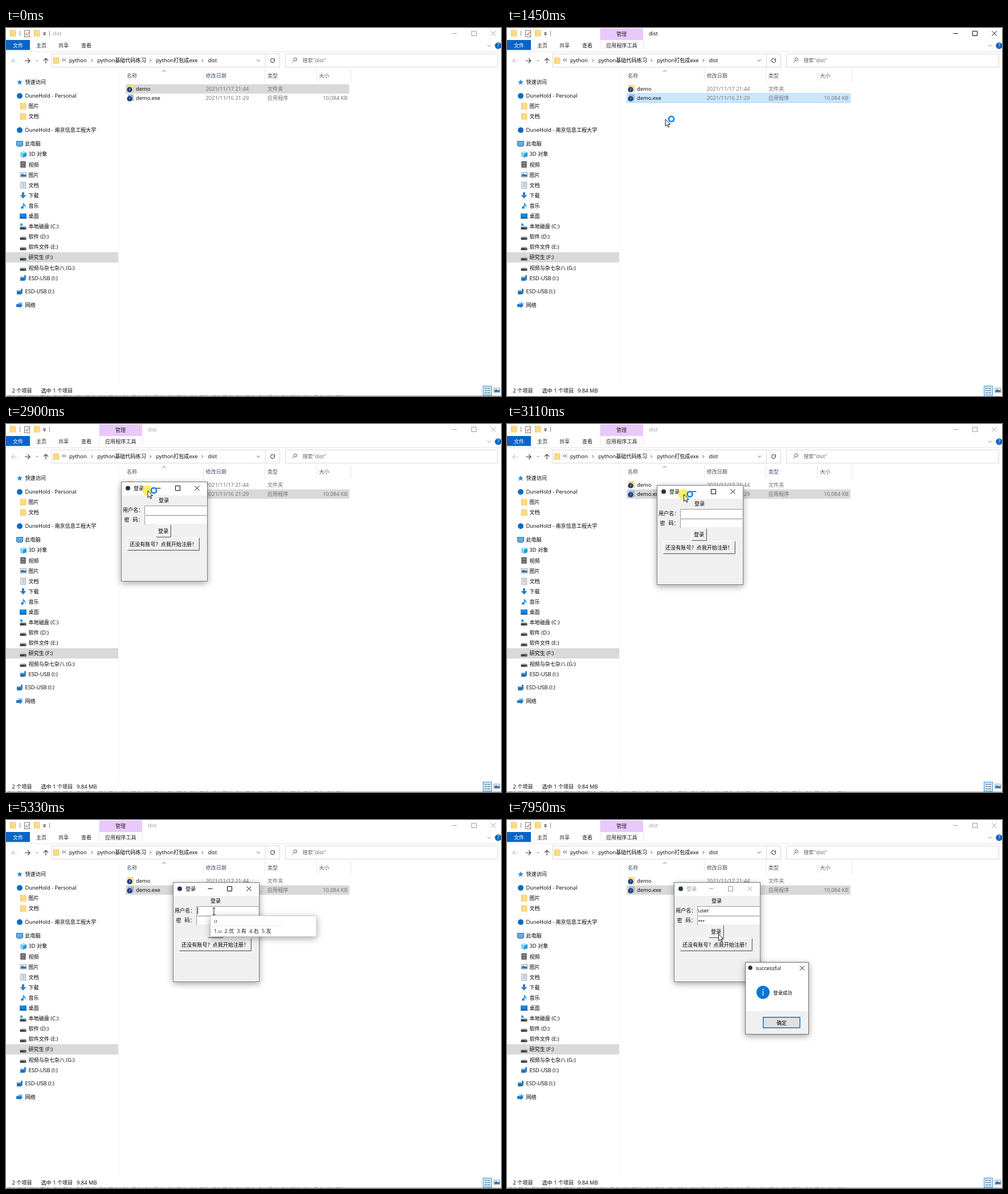
Write an HTML page that moves like this. It is 869x645 px and loops after 8 s.

```html
<!DOCTYPE html>
<html lang="zh">
<head>
<meta charset="utf-8">
<style>
html, body { margin: 0; width: 100%; height: 100%; overflow: hidden; background: #fff; }
svg { display: block; width: 869px; height: 645px; }
text { font-family: "Open Sans", "Noto Sans", "Noto Sans CJK SC", "Noto Sans CJK", sans-serif; white-space: pre; }
.float { filter: drop-shadow(0 3px 6px rgba(0,0,0,.36)); }
</style>
</head>
<body>
<svg id="stage" viewBox="0 0 869 645"></svg>
<script>
const LOOP = 8000;
const LATIN = 9.35, HAN = 9.1;

// ---- drawing helpers (strings of SVG) ----
const rect = (x, y, w, h, fill, extra = '') =>
  `<rect x="${x}" y="${y}" width="${w}" height="${h}" fill="${fill}" ${extra}/>`;
const box = (x, y, w, h, fill, stroke) => rect(x, y, w, h, fill, `stroke="${stroke}"`);
const disc = (x, y, r, fill, extra = '') => `<circle cx="${x}" cy="${y}" r="${r}" fill="${fill}" ${extra}/>`;
const shape = (d, fill) => `<path d="${d}" fill="${fill}"/>`;
const line = (d, color, width = 1) =>
  `<path d="${d}" fill="none" stroke="${color}" stroke-width="${width}"/>`;
const group = (id, body, cls = '') => `<g id="${id}" class="${cls}">${body}</g>`;

// y is the middle of the line; Han and Latin runs differ slightly in size
function label(x, y, str, fill = '#000', { id = '', scale = 1, anchor = 'start' } = {}) {
  const runs = str.match(/[\u3000-\uffef]+|[^\u3000-\uffef]+/g) || [];
  const spans = runs.map(run => {
    const size = (/[\u3000-\uffef]/.test(run) ? HAN : LATIN) * scale;
    return `<tspan font-size="${size}">${run}</tspan>`;
  }).join('');
  return `<text ${id && `id="${id}"`} x="${x}" y="${y + 3.4 * scale}" fill="${fill}" text-anchor="${anchor}">${spans}</text>`;
}

const controls = (x, y, gap, r = 4) =>
  line(`M${x - r} ${y + .5}h${2 * r}M${x + gap - r} ${y - r + .5}h${2 * r}v${2 * r}h${-2 * r}z` +
       `M${x + 2 * gap - r} ${y - r + .5}l${2 * r} ${2 * r}m0 ${-2 * r}l${-2 * r} ${2 * r}`, 'currentColor');
const chevron = (x, y, color, r = 3) => line(`M${x - r} ${y - r / 2}l${r} ${r}l${r} ${-r}`, color);

// ---- icons, placed by their middle ----
const icon = {
  folder: (x, y) => rect(x - 5, y - 6, 10, 12, '#fbdc86') + rect(x - 5, y - 6, 2, 12, '#f5ce70') + rect(x + 4, y - 4, 1.5, 10, '#f7cf6c'),
  star: (x, y) => shape(`M${x} ${y - 5}l1.4 3.4l3.6 .2l-2.8 2.4l1 3.6l-3.2 -2l-3.2 2l1 -3.6l-2.8 -2.4l3.6 -.2z`, '#2a8ad8'),
  cloud: (x, y) => disc(x, y, 5, '#0a6cc8'),
  pc: (x, y) => box(x - 5.5, y - 4.5, 11, 7.5, '#5bb1ef', '#2d6fa8') + rect(x - 4, y + 4, 8, 1.2, '#477a9e'),
  cube: (x, y) => shape(`M${x - 5} ${y - 3}l6 -2l5 2v7l-6 2l-5 -2z`, '#1e9fe0') + shape(`M${x - 5} ${y - 3}l5 2v7l-5 -2z`, '#7fd3f3') + shape(`M${x - 5} ${y - 3}l6 -2l5 2l-6 2z`, '#b8e8f8'),
  film: (x, y) => rect(x - 5, y - 5.5, 10, 11, '#44494f') + rect(x - 2.5, y - 4, 5, 3.5, '#7e94b0') + rect(x - 2.5, y + .7, 5, 3.5, '#b07d62') + line(`M${x - 4} ${y - 5}v10m8 0v-10`, '#ccc', .8),
  photo: (x, y) => box(x - 5, y - 4, 10.5, 8, '#e4f2fc', '#9aa4ad') + shape(`M${x - 4} ${y + 3}v-3l3 -2l3 2l3 -1v4z`, '#396f9f'),
  doc: (x, y) => box(x - 4, y - 5, 8.5, 10.5, '#fff', '#8c959d') + line(`M${x - 2} ${y - 2.5}h5m-5 2.5h5m-5 2.5h5`, '#5b93c5'),
  down: (x, y) => shape(`M${x - 2} ${y - 5.5}h4v5h3.5l-5.5 6l-5.5 -6h3.5z`, '#2d7fd0'),
  note: (x, y) => shape(`M${x} ${y - 6}q1 3 4 5q1 3 -1 5q1 -4 -2 -5v4a2.4 2.2 0 1 1 -1.4 -2z`, '#1888e0'),
  desk: (x, y) => rect(x - 6, y - 4.5, 12, 9, '#1481d6') + rect(x - 6, y + 2.5, 12, 2, '#0b5ca0') + rect(x - 4.5, y - 3, 6, 1, '#39aef5'),
  drive: (x, y) => shape(`M${x - 4} ${y - .5}h8l1.5 2h-11z`, '#b9bdc1') + rect(x - 5.5, y + 1.5, 11, 4, '#3b3f43') + rect(x + 2.5, y + 3, 1.6, 1, '#7fe07f'),
  system: (x, y) => icon.drive(x, y) + rect(x - 5, y - 5, 4, 4, '#22a0ea'),
  usb: (x, y) => shape(`M${x - 5} ${y - 2}h7v-3h3v8l-3 2h-7z`, '#3a7fb8') + shape(`M${x - 4} ${y - 1}l3 -3l3 3z`, '#8ed0f5') + rect(x - 3.5, y + 1.5, 5, 1, '#183a58'),
  net: (x, y) => rect(x - 3, y - 5, 8, 6, '#8ccbf3') + shape(`M${x - 6} ${y - 2}h6v-2l5 4.5l-5 4.5v-2h-6z`, '#2876c4'),
};
const badge = (x, y) => disc(x, y, 4.6, '#17387c') + label(x, y, '?', '#fff', { scale: .85, anchor: 'middle' });

function sidebar() {
  const BRAND = 'DuneHold';
  const tree = [
    ['star', '快速访问', 95, 0], ['cloud', BRAND + ' - Personal', 119, 0], ['folder', '图片', 137, 1], ['folder', '文档', 155, 1],
    ['cloud', BRAND + ' - 南京信息工程大学', 179, 0], ['pc', '此电脑', 203, 0],
    ...[['cube', '3D 对象'], ['film', '视频'], ['photo', '图片'], ['doc', '文档'], ['down', '下载'], ['note', '音乐'], ['desk', '桌面'],
      ['system', '本地磁盘 (C:)'], ['drive', '软件 (D:)'], ['drive', '软件文件 (E:)'], ['drive', '研究生 (F:)'],
      ['drive', '视频与杂七杂八 (G:)'], ['usb', 'ESD-USB (I:)']].map(([kind, name], i) => [kind, name, 221 + i * 18.1, 1]),
    ['usb', 'ESD-USB (I:)', 462, 0], ['net', '网络', 486, 0],
  ];
  return rect(0, 393, 197, 18, '#d9d9d9') + line('M198.5 72V625', '#f5f5f5') +
    tree.map(([kind, name, y, deep]) => icon[kind](24 + 6 * deep, y) + label(33.5 + 6 * deep, y, name)).join('');
}

function ribbon() {
  return icon.folder(12, 9) + line('M24.5 5v9M76.5 5v9', '#888') +
    box(32.5, 4.5, 9, 11, '#fff', '#777') + line('M34.5 10l2 2l4 -5', '#c05a2c', 1.2) + icon.folder(54, 9) +
    line('M65 8.5h5', '#222') + shape('M65 10.5h5l-2.5 2.5z', '#222') +
    group('toolTab', rect(163.5, 1, 75.5, 20, '#e9c8fb') + rect(163.5, 21, 75.5, 18, '#fefbff') +
      line('M163.5 21v17M239.5 21v17', '#eee4f3') + label(192, 11, '管理', '#222') + label(174, 31, '应用程序工具', '#222')) +
    `<g id="frame">${controls(787.5, 9, 34)}${label(0, 10, 'dist', 'currentColor', { id: 'title' })}</g>` +
    rect(0, 21, 42, 17.5, '#0a64c6') + label(12, 30.5, '文件', '#fff') +
    label(53, 31, '主页', '#222') + label(92, 31, '共享', '#222') + label(132, 31, '查看', '#222') +
    line('M0 41.5H869', '#e6e6e6') + chevron(848, 31, '#888') + disc(864, 31, 5.8, '#0b62c4') +
    label(864, 31, '?', '#fff', { anchor: 'middle' });
}

function addressBar() {
  const crumbs = [[111, 'python'], [160.5, 'python基础代码练习'], [263.5, 'python打包成exe'], [354.5, 'dist']];
  return line('M19 57.5h-9m4 -4l-4 4l4 4', '#c4c4c4', 1.2) + line('M33 57.5h9m-4 -4l4 4l-4 4', '#444', 1.2) +
    chevron(54.5, 57, '#777', 2) + line('M70 62v-9m-4 4l4 -4l4 4', '#444', 1.2) +
    box(80.5, 45.5, 400, 23, '#fff', '#d9d9d9') + line('M455.5 45v24', '#d9d9d9') + icon.folder(88, 57) +
    line('M101.5 53.5l-2.5 2.5l2.5 2.5m3.5 -5l-2.5 2.5l2.5 2.5', '#333') + crumbs.map(([x, s]) => label(x, 57, s)).join('') +
    [151, 254, 345].map(x => line(`M${x - 1.5} 54.5l2.5 2.5l-2.5 2.5`, '#555')).join('') +
    chevron(443, 57, '#555') + line('M471.5 56a3.5 3.5 0 1 1 -2 -2.3M471.5 53v3h-3', '#444', 1.1) +
    box(490.5, 45.5, 373, 23, '#fff', '#d9d9d9') +
    disc(508, 55, 2.8, 'none', 'stroke="#666"') + line('M506 57l-3.5 3.5', '#666') + label(520.5, 57, '搜索"dist"', '#666');
}

function fileList() {
  const gray = '#6d6d6d';
  const row = (y, name, date, kind, size) => label(228, y, name) + label(350.5, y, date, gray) + label(459, y, kind, gray) + label(599.5, y, size, gray, { anchor: 'end' });
  return [[212, '名称'], [350.5, '修改日期'], [459, '类型'], [549.5, '大小']].map(([x, s]) => label(x, 84, s, '#46566b')).join('') +
    line('M346.5 73v22M454.5 73v22M545.5 73v22M605.5 73v22', '#e5e5e5') + line('M274 77l3 -3l3 3', '#777') +
    rect(210, 98.5, 392.5, 16.5, '#d9d9d9', 'id="rowA"') + rect(210.5, 115, 392, 15.5, '#fff', 'id="rowB"') +
    icon.folder(218.5, 106) + badge(217, 108) + rect(214, 116.5, 10, 11, '#9db7cd') + badge(217, 124) +
    row(106.5, 'demo', '2021/11/17 21:44', '文件夹', '') + row(122.7, 'demo.exe', '2021/11/16 21:29', '应用程序', '10,084 KB');
}

function statusBar() {
  return label(10.5, 635.5, '2 个项目') + label(61.5, 635.5, '选中 1 个项目') + label(124, 635.5, '9.84 MB', '#000', { id: 'bytes' }) +
    box(837.5, 627.5, 15, 16, '#cce8ff', '#3a9ce0') + line('M840 631.5h4m1 0h5M840 635.5h4m1 0h5M840 639.5h4m1 0h5', '#666') + icon.photo(861.5, 635) +
    group('strip', line('M0 644.5H869', '#b4b4b4') +
      `<path d="M4 644.5H594" stroke="#777" stroke-dasharray="5 3 2 6 8 4 3 9"/>`);
}

const button = (x, y, w, h, tx, ty, s) => rect(x, y, w, h, '#f0f0f0') +
  line(`M${x} ${y + h}V${y}H${x + w}`, '#fff') + line(`M${x + w - 1} ${y + 1}v${h - 2}h${1 - w}`, '#c4c4c4') +
  line(`M${x + w} ${y}v${h}h${-w}`, '#6c6c6c') + label(tx, ty, s);
const entry = y => rect(41, y, 109.5, 16, '#fff') + line(`M41.5 ${y + 16}V${y + .5}H150.5`, '#999') + line(`M42 ${y + 15.5}H150`, '#ececec');

// drawn around its own top left corner
function loginWindow() {
  return box(.5, .5, 151, 174, '#f0f0f0', '#7d7d7d') + rect(1, 1, 150, 23, '#fff') + disc(12, 11.5, 4, '#24344f') +
    `<g id="loginBar">${label(22, 12, '登录', 'currentColor')}${controls(65.5, 11, 34)}</g>` +
    label(66, 33, '登录') + label(3, 49.5, '用户名：') + label(5.5, 67, '密') + label(20.5, 67, '码：') + entry(42) + entry(59) +
    button(61.5, 75.5, 26, 22, 65, 87, '登录') + button(11.5, 98.5, 126, 22, 15, 109.5, '还没有账号？点我开始注册！') +
    label(42.5, 50, 'user', '#000', { id: 'userText' }) + label(42.5, 67.5, '', '#000', { id: 'passText' }) +
    rect(0, 0, 1, 12, '#000', 'id="caret"');
}

function dialog() {
  return box(418.5, 249.5, 111, 126, '#fff', '#6e6e6e') + rect(419, 335, 110, 40, '#f0f0f0') + disc(427, 259, 3.8, '#24344f') +
    label(436.5, 259.5, 'successful') + line('M514 255.5l8 8m0 -8l-8 8', '#111') + disc(449.5, 302, 11.5, '#0a76d6') +
    disc(449.5, 297, 1, '#fff') + line('M449.5 299.5v8', '#fff', 1.3) + label(467.5, 302.5, '登录成功', '#000', { scale: .91 }) +
    rect(449.75, 345.75, 64.5, 18.5, '#e1e1e1', 'stroke="#0078d7" stroke-width="1.5"') + label(473.5, 355.5, '确定', '#000', { scale: .95 });
}

const pointer = group('pointer',
  disc(0, 0, 9.5, '#ffe83c', 'id="press" opacity=".78"') +
  group('arrow', `<path d="M.5 .5v12l2.8 -2.6l2 4.4l2 -.9l-2 -4.3h3.9z" fill="#fff" stroke="#111"/>`) +
  group('ring', disc(11, 0, 4.6, '#e8f5ff', 'stroke="#1c8bea" stroke-width="2.8"')) +
  group('beam', line('M-2.5 -6h2l.5 .5l.5 -.5h2M0 -6v12M-2.5 6h2l.5 -.5l.5 .5h2', '#111')));

const stage = document.getElementById('stage');
stage.innerHTML = rect(0, 0, 869, 645, '#fff') + sidebar() + ribbon() + addressBar() + fileList() + statusBar() +
  group('login', loginWindow(), 'float') +
  group('ime', rect(359, 168, 186, 36, '#fff', 'id="imeBox" stroke="#c5d3e2"') + line('M364 185.5h120', '#e3e9f0') +
    `<g id="imeText"></g>`, 'float') +
  group('dialog', dialog(), 'float') + pointer;

// ---- timing tables ----
const STEP = 70;
const bursts = [130, 670, 1520, 2760, 3600, 4440, 7010, 7410];
const cursorPath = [
  [130, 300, 80], [340, 266, 112], [470, 262, 120], [950, 262, 120], [1440, 277.5, 159.5],
  [1520, 270, 156], [1940, -61, 55], [2690, -61, 55], [2760, 0, 66], [2830, 140, 94], [2900, 248.5, 116.5],
  [3110, 310, 123], [3390, 340, 125], [3530, 363, 133], [3880, 363, 137], [4020, 411, 262], [4160, 404, 245],
  [4370, 370, 187], [4440, 368, 178], [4580, 365, 159], [7010, 365, 163], [7080, 364, 175], [7480, 364, 175], [7750, 371, 199.5],
];
const loginPath = [
  [2690, -108, 39], [2760, -47, 50], [2830, 93, 78], [2900, 202, 101], [3110, 263, 107], [3390, 293, 109],
];
const presses = [[740, 810], [880, 950], [2690, 3390], [4650, 4780], [7080, 7180], [7750, 7880]];
const userCaret = [[4720, 5350], [5650, 6250], [6400, 6810]];
const passCaret = [[7150, 7750]];
const imeSteps = [
  [5330, 'u', '1.u  2.优  3.有  4.右  5.友', 186], [5600, 'us', '1.us  2.优势  3.优胜', 186],
  [5870, 'use', '1.use  2.优色  3.有色  4.优', 224], [6200, 'user', '1.user  2.优色  3.有色', 212],
];

const within = (t, spans) => spans.some(([a, b]) => t >= a && t < b);
function along(path, t) {
  const next = path.findIndex(p => p[0] > t);
  if (next < 0) return path[path.length - 1].slice(1);
  if (next === 0) return path[0].slice(1);
  const [t0, x0, y0] = path[next - 1], [t1, x1, y1] = path[next];
  const k = (t - t0) / (t1 - t0);
  return [x0 + (x1 - x0) * k, y0 + (y1 - y0) * k];
}
function stepped(t) {
  const start = bursts.filter(b => b <= t).pop() ?? 0;
  return start + Math.floor((t - start) / STEP) * STEP;
}

const el = {};
stage.querySelectorAll('[id]').forEach(node => el[node.id] = node);
const show = (node, on) => node.setAttribute('display', on ? 'inline' : 'none');
const move = (node, [x, y]) => node.setAttribute('transform', `translate(${x} ${y})`);
const place = (node, attrs) => Object.entries(attrs).forEach(([k, v]) => node.setAttribute(k, v));
let imeShown = '';

function render(t) {
  const q = stepped(t);
  const [cx, cy] = along(cursorPath, q);

  const selected = t >= 740, active = selected && t < 2080;
  show(el.toolTab, selected);
  show(el.bytes, selected);
  show(el.strip, !active);
  place(el.title, { x: selected ? 249 : 82 });
  el.frame.style.color = active ? '#000' : '#999';
  show(el.rowA, !selected);
  const hover = !selected && t >= 130 && cy > 115;
  place(el.rowB, {
    fill: active ? '#cce8ff' : selected ? '#d9d9d9' : hover ? '#e5f3ff' : '#fff',
    stroke: active ? '#99d1ff' : selected ? '#d9d9d9' : 'none',
  });

  show(el.login, t >= 2080);
  move(el.login, along(loginPath, q).map(Math.round));
  el.loginBar.style.color = t >= 7880 ? '#999' : '#000';
  show(el.dialog, t >= 7880);

  const typed = t >= 6400;
  const stars = t < 7410 ? 0 : Math.min(3, 1 + Math.floor((t - 7410) / STEP));
  show(el.userText, typed);
  el.passText.innerHTML = `<tspan font-size="7">${'*'.repeat(stars)}</tspan>`;
  const inPass = t >= 7080;
  show(el.caret, within(t, inPass ? passCaret : userCaret));
  place(el.caret, { x: inPass ? 43 + stars * 3.85 : typed ? 61.5 : 43, y: inPass ? 61 : 44 });

  const ime = typed ? null : imeSteps.filter(s => s[0] <= t).pop();
  show(el.ime, !!ime);
  if (ime && ime[1] !== imeShown) {
    imeShown = ime[1];
    place(el.imeBox, { width: ime[3] });
    el.imeText.innerHTML = label(365, 177, ime[1], '#333') + label(365, 194.5, ime[2], '#222');
  }

  const beam = t >= 4440 && cy < 184;
  show(el.pointer, t >= 130);
  move(el.pointer, [cx, cy]);
  show(el.arrow, !beam);
  show(el.beam, beam);
  show(el.ring, t >= 1020 && t < 4160);
  show(el.press, within(t, presses));
}

const origin = performance.now();
function tick() {
  render((performance.now() - origin) % LOOP);
  requestAnimationFrame(tick);
}
tick();
</script>
</body>
</html>
```
